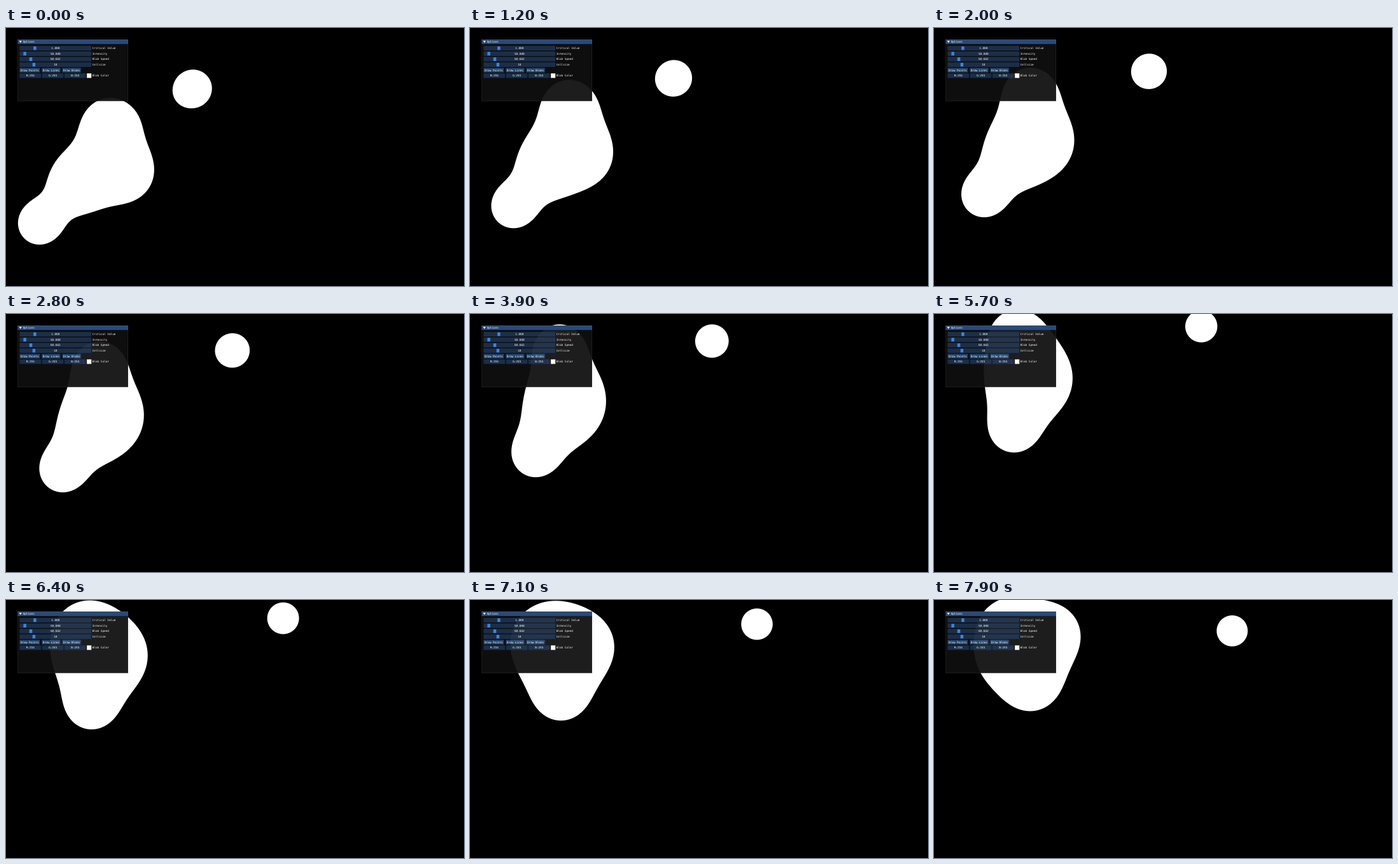
An HTML page with a canvas for the animation above (8 s loop, 720 by 405 pixels).

```html
<!DOCTYPE html>
<html lang="en">
<head>
<meta charset="utf-8">
<title>Metaballs</title>
<style>
html, body { margin: 0; width: 100%; height: 100%; overflow: hidden; background: #000; }
canvas, svg { position: absolute; left: 0; top: 0; width: 720px; height: 405px; }
text { font: 11.63px "DejaVu Sans Mono", monospace; fill: #fff; white-space: pre; }
</style>
</head>
<body>
<canvas id="stage" width="720" height="405"></canvas>
<svg id="panel" viewBox="0 0 1920 1080"></svg>
<script>
const W = 720, H = 405, LOOP = 8000, STEP = 100;
const RADIUS = 18.75; // blob intensity, also the bounce margin
const LEVEL = 1 / RADIUS;

// start position and velocity in px and px/s
const blobs = [
  { x: 50.2, y: 308.6, vx: 13, vy: -22.1 },
  { x: 161.5, y: 148, vx: -5.6, vy: -24.8 },
  { x: 190.7, y: 229.5, vx: -9.3, vy: -23.6 },
  { x: 114, y: 240, vx: 9.2, vy: -23.8 },
  { x: 295.5, y: 93.9, vx: 22, vy: -13.27 }
];

const ctx = document.getElementById('stage').getContext('2d');
const image = ctx.createImageData(W, H);
image.data.fill(255);

function drawBlobs(t) {
  const centers = blobs.map(b => [
    b.x + b.vx * t,
    RADIUS + Math.abs(b.y + b.vy * t - RADIUS)
  ]);
  for (let py = 0, i = 3; py < H; py++) {
    for (let px = 0; px < W; px++, i += 4) {
      let field = 0, gx = 0, gy = 0;
      for (const [cx, cy] of centers) {
        const dx = px + 0.5 - cx, dy = py + 0.5 - cy;
        const inv = 1 / Math.sqrt(dx * dx + dy * dy + 1e-6);
        const cube = inv * inv * inv;
        field += inv;
        gx += dx * cube;
        gy += dy * cube;
      }
      // distance to the contour gives a smooth edge
      const edge = (field - LEVEL) / (Math.hypot(gx, gy) + 1e-9) + 0.5;
      image.data[i] = field > 2 * LEVEL ? 255 : 255 * Math.min(1, Math.max(0, edge));
    }
  }
  ctx.putImageData(image, 0, 0);
}

const LEFT = 57, WIDTH = 301, ROW = 19;
const FRAME = 'rgba(41,74,122,.54)', BUTTON = 'rgba(66,150,250,.4)';
const rowY = n => 75 + 23 * n;

const rect = (x, y, w, h, fill, extra = '') =>
  `<rect x="${x}" y="${y}" width="${w}" height="${h}" fill="${fill}" ${extra}/>`;
const label = (x, y, s, anchor = 'start') =>
  `<text x="${x}" y="${y + 13}" text-anchor="${anchor}">${s}</text>`;
const box = (x, y, w, s, fill) =>
  rect(x, y, w, ROW, fill) + label(x + w / 2, y, s, 'middle');

function buildPanel() {
  let svg = rect(49, 48, 463, 258, 'rgba(15,15,15,.94)')
    + rect(49, 48, 463, ROW, '#294a7a')
    + rect(49.5, 48.5, 462, 257, 'none', 'stroke="rgba(110,110,128,.5)"')
    + '<path d="M55 53.5h11l-5.5 9z" fill="#fff"/>'
    + label(71, 48, 'Options');

  [['Critical Value', '1.000', 121], ['Intensity', '50.000', 79],
   ['Blob Speed', '60.662', 104], ['Cellsize', '10', 117]
  ].forEach(([name, value, grab], n) => {
    const y = rowY(n);
    svg += rect(LEFT, y, WIDTH, ROW, FRAME)
      + rect(grab - 6, y + 2, 12, 15, '#3d85e0')
      + label(LEFT + WIDTH / 2, y, value, 'middle')
      + label(362, y, name);
  });

  let x = LEFT;
  for (const name of ['Draw Points', 'Draw Lines', 'Draw Blobs']) {
    const w = name.length * 7 + 8;
    svg += box(x, rowY(4), w, name, BUTTON);
    x += w + 8;
  }

  ['R', 'G', 'B'].forEach((c, n) => {
    svg += box(LEFT + 94 * n, rowY(5), 90, c + ':255', FRAME);
  });
  svg += rect(339, rowY(5), ROW, ROW, '#fff') + label(362, rowY(5), 'Blob Color');
  document.getElementById('panel').innerHTML = svg;
}

let shown = -1;
const start = performance.now();
function tick() {
  const step = Math.floor((performance.now() - start) % LOOP / STEP);
  if (step !== shown) {
    shown = step;
    drawBlobs(step * STEP / 1000);
  }
  requestAnimationFrame(tick);
}

buildPanel();
tick();
</script>
</body>
</html>
```
